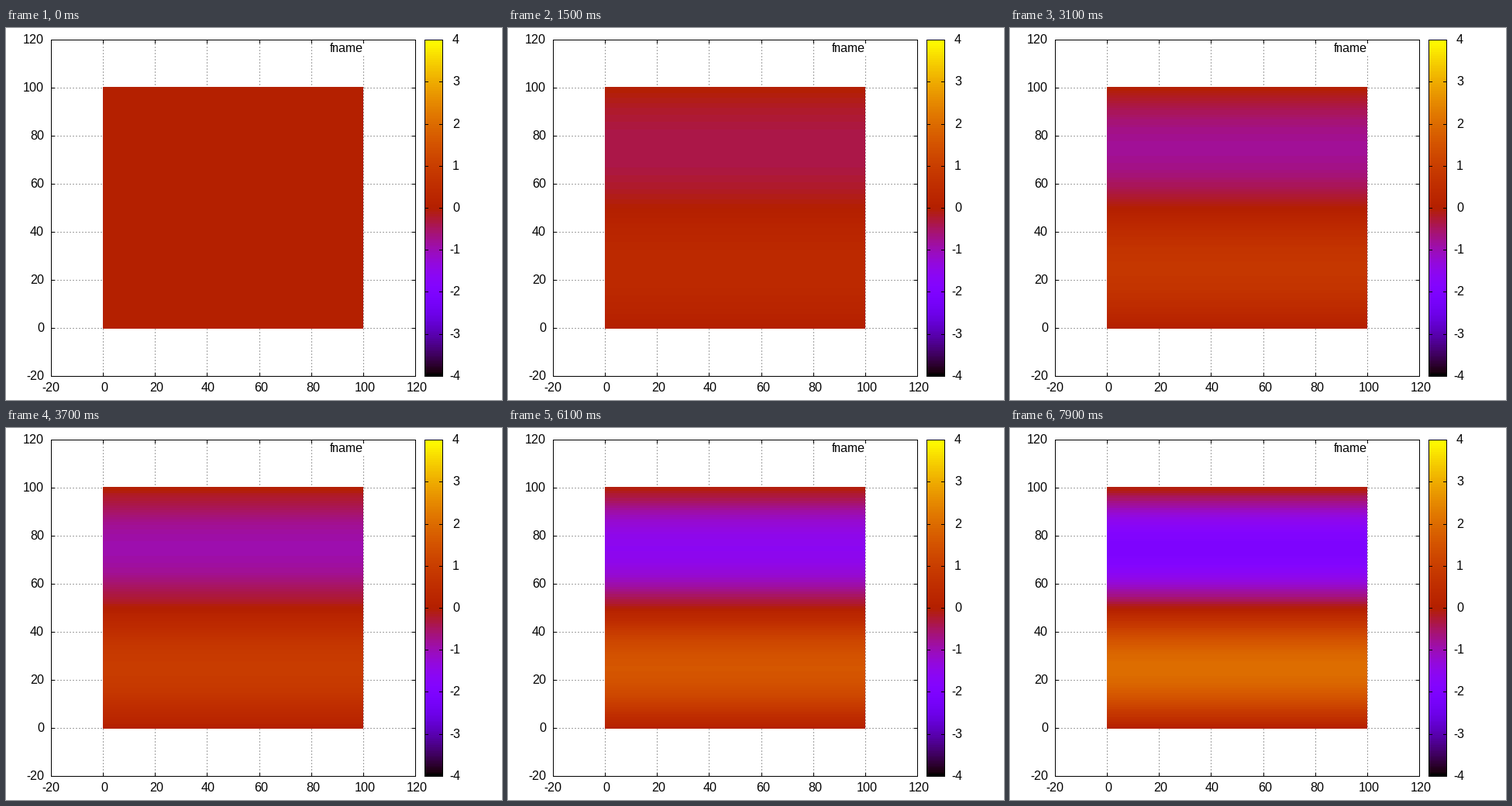
These frames come from a looping animation (640 px wide and 480 px high, 8 s). A matplotlib script:

```python
import numpy as np
import matplotlib.pyplot as plt
from matplotlib.animation import FuncAnimation

W, H, DPI = 640, 480, 80
PX = 72 / DPI                      # one pixel in points
LEFT, RIGHT, TOP, BOTTOM = 58, 528, 15, 449
BAR_L, BAR_R = 540, 563
FIELD = (125, 461, 388, 76)        # left, right, bottom, top
LEVELS = 164
FRAMES, STEP_MS = 80, 100
GROWTH = 0.02567                   # amplitude gained per frame

plt.rcParams.update({
    "font.family": "Liberation Sans",
    "text.hinting": "default",
    "text.hinting_factor": 1,
})


def palette(level):
    """Black-violet-red-yellow ramp, sampled in discrete levels."""
    g = np.clip(level, 0, LEVELS - 1) / (LEVELS - 1)
    blue = np.clip(np.sin(2 * np.pi * g), 0, 1)
    return np.stack([np.sqrt(g), g ** 3, blue], axis=-1)


def to_level(value):
    return np.floor((value + 4) / 8 * LEVELS + 1e-9)


def px_x(v):
    return round(LEFT + (v + 20) / 140 * (RIGHT - LEFT))


def px_y(v):
    return round(BOTTOM - (v + 20) / 140 * (BOTTOM - TOP))


fig = plt.figure(figsize=(W / DPI, H / DPI), dpi=DPI, facecolor="white")
ax = fig.add_axes([0, 0, 1, 1])


def stroke(xs, ys, color, z, style):
    ax.plot(xs, ys, color=color, lw=PX, ls=style, zorder=z, snap=False,
            solid_capstyle="butt", dash_capstyle="butt")


def hline(x0, x1, y, color="black", z=4, style="-"):
    """Fill the pixels x0..x1 of row y."""
    stroke([x0, x1 + 1], [y + 0.5, y + 0.5], color, z, style)


def vline(x, y0, y1, color="black", z=4, style="-"):
    """Fill the pixels of column x from y1 up to y0."""
    stroke([x + 0.5, x + 0.5], [y1 + 1, y0], color, z, style)


def label(x, y, text, ha):
    ax.text(x, y, text, ha=ha, va="baseline", fontsize=16 * PX, zorder=5)


def frame_box(x0, x1):
    for x in (x0, x1):
        vline(x, TOP, BOTTOM)
    for y in (TOP, BOTTOM):
        hline(x0, x1, y)


def side_ticks(x0, x1, y, size=4):
    hline(x0, x0 + size, y)
    hline(x1 - size, x1, y)


def image(colors, extent):
    return ax.imshow(colors[:, None, :], extent=extent, aspect="auto",
                     interpolation="nearest", zorder=2)


# Main plot: grid, ticks and labels
grid = dict(color="#a0a0a0", z=1, style=(0, (2, 2)))
for v in range(-20, 121, 20):
    x, y = px_x(v), px_y(v)
    if -20 < v < 120:
        start = 36 if v == 100 else TOP   # the grid leaves room for the key
        vline(x, start, BOTTOM, **grid)
        hline(LEFT, RIGHT, y, **grid)
    vline(x, BOTTOM - 4, BOTTOM)
    vline(x, TOP, TOP + 4)
    side_ticks(LEFT, RIGHT, y)
    label(x + (2 if v >= 0 else 0), 469, str(v), "center")
    label(49, y + 5, str(v), "right")
frame_box(LEFT, RIGHT)
label(461, 31, "fname", "right")

# Colour bar
bar_rows = np.arange(BOTTOM - TOP)[::-1]
bar = palette(np.floor((bar_rows + 0.5) / len(bar_rows) * LEVELS))
image(bar, (BAR_L, BAR_R, BOTTOM, TOP))
frame_box(BAR_L, BAR_R)
for v in range(-4, 5):
    y = round(BOTTOM - (v + 4) / 8 * (BOTTOM - TOP))
    side_ticks(BAR_L, BAR_R, y)
    label(576 if v >= 0 else 572, y + 5, str(v), "left")

# Standing wave: one value per unit cell, the mean of its two edges
rows = np.arange(FIELD[3], FIELD[2])
cell = np.clip(np.floor((387.5 - rows) / 3.1), 0, 99)
wave = (np.sin(2 * np.pi * cell / 100)
        + np.sin(2 * np.pi * (cell + 1) / 100)) / 2


def field(n):
    return palette(to_level(GROWTH * n * wave))


sheet = image(field(0), FIELD)
ax.set_xlim(0, W)
ax.set_ylim(H, 0)
ax.axis("off")


def update(n):
    sheet.set_data(field(n)[:, None, :])
    return [sheet]


anim = FuncAnimation(fig, update, frames=FRAMES, interval=STEP_MS,
                     repeat=True, repeat_delay=0, blit=False)
plt.show()
```
